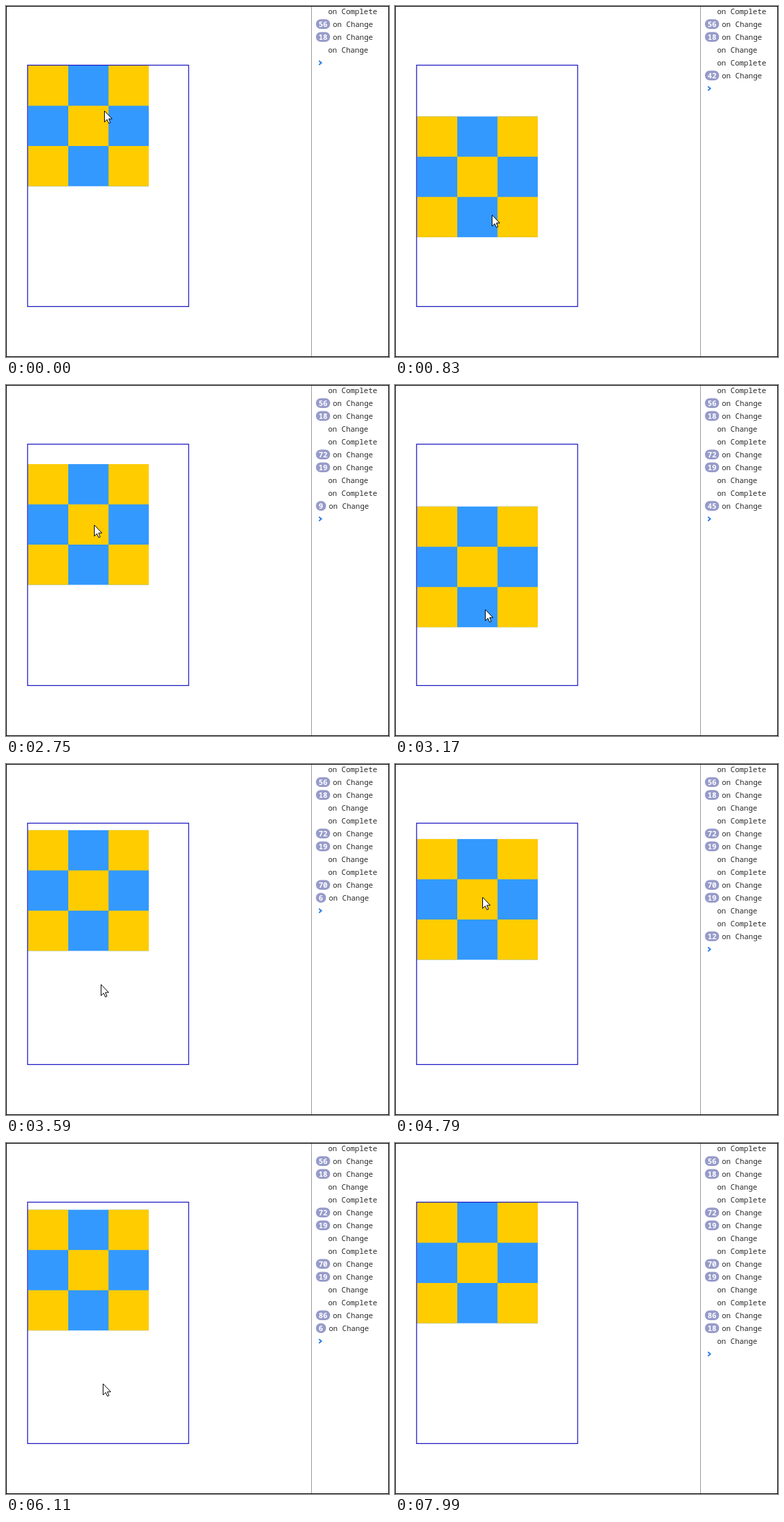
Animation, 566 px wide and 519 px high, one loop 8050 ms. Source, as an HTML page with a canvas:

```html
<!DOCTYPE html>
<html lang="en">
<head>
<meta charset="utf-8">
<title>Pull and bounce</title>
<style>
html, body { margin: 0; width: 100%; height: 100%; overflow: hidden; background: #fff; }
canvas { display: block; }
</style>
</head>
<body>
<canvas id="stage" width="566" height="519"></canvas>
<script>
const ctx = document.getElementById('stage').getContext('2d');
const LOOP = 8050, TICK = 60;
const CELL = 59.5, ROW = 19;

// Runs of steady ticks: [start ms, number of ticks]; the picture rests in between.
const RUNS = [[0, 1], [100, 1], [470, 13], [1310, 78], [6110, 6], [6720, 10], [7570, 1], [7810, 4]];

// Each pull: press and release tick, pointer from (x0, y0) to (x1, y1), y after letting go,
// ease-out power, and the calls logged while pulling and bouncing.
const PULLS = [
  { down: 1, up: 13.62, x0: 144, y0: 158, x1: 139, y1: 348, rest: 348, power: 1.8, calls: 72, bounces: 19 },
  { down: 37.2, up: 51.3, x0: 130, y0: 149, x1: 140, y1: 349, rest: 326, power: 2.45, calls: 70, bounces: 19 },
  { down: 70.17, up: 91.343, x0: 129, y0: 151, x1: 143, y1: 356, rest: 356, power: 1.735, calls: 86, bounces: 18 }
];
const START = { x: 145, y: 155 };
const LEAVE = { down: 109, x0: 122, y0: 194 };
const EXIT = 113, REST = 6, SLIP = 1.6;

const clamp = t => Math.min(1, Math.max(0, t));
const mix = (a, b, t) => a + (b - a) * t;
const smooth = t => t * t * (3 - 2 * t);
const pullTime = (p, k) => clamp((k - p.down) / (Math.floor(p.up) - p.down));
const bounceCount = (p, k) => Math.floor((k - p.up) * 3.6 + 0.3);

function tickAt(ms) {
  let tick = 0, base = 0;
  for (const [start, n] of RUNS) {
    if (ms < start) break;
    tick = base + Math.min(n - 1, Math.floor((ms - start) / TICK));
    base += n;
  }
  return tick;
}

function pointer(k) {
  const begun = PULLS.filter(p => k >= p.down).length;
  if (!begun) return START;
  if (k > LEAVE.down) {
    const t = (k - LEAVE.down) / 3;
    return { x: LEAVE.x0 + 258 * t * t, y: LEAVE.y0 - 50 * t };
  }
  const p = PULLS[begun - 1];
  if (k < p.up) {
    const t = pullTime(p, k);
    return { x: mix(p.x0, p.x1, t ** 3), y: mix(p.y0, p.y1, 1 - (1 - t) ** p.power) };
  }
  const next = PULLS[begun] || LEAVE;
  const leave = p.up + REST;
  const home = smooth(clamp((k - leave) / (next.down - leave)));
  const still = mix(p.y1, p.rest, clamp((k - p.up) / SLIP));
  return { x: mix(p.x1, next.x0, home), y: mix(still, next.y0, home) };
}

function gridOffset(k) {
  const p = PULLS.filter(q => k >= q.down).pop();
  if (!p) return 0;
  if (k < p.up) return (pointer(k).y - p.y0) / 2;
  if (bounceCount(p, k) > p.bounces) return 0;
  return (p.y1 - p.y0) / 2 * 2 ** (-10 * (k - p.up) * TICK / 305);
}

function logRows(k) {
  const rows = [];
  const change = n => n > 0 && rows.push(['on Change', n]);
  const complete = () => rows.push(['on Complete', 1]);
  complete();
  [56, 18, 1].forEach(change);
  for (const p of PULLS) {
    if (k < p.down) break;
    complete();
    change(Math.round(p.calls * pullTime(p, k)));
    if (k < p.up) break;
    const n = bounceCount(p, k);
    change(Math.min(n, p.bounces));
    if (n > p.bounces) change(1);
  }
  return rows;
}

function drawGrid(top) {
  const left = 32.5;
  ctx.fillStyle = '#3399ff';
  ctx.fillRect(left, top, 3 * CELL, 3 * CELL);
  ctx.fillStyle = '#ffcc00';
  for (let i = 0; i < 9; i += 2) {
    ctx.fillRect(left + i % 3 * CELL, top + Math.floor(i / 3) * CELL, CELL, CELL);
  }
}

function drawFrames() {
  ctx.lineWidth = 1.25;
  ctx.strokeStyle = '#1a14c0';
  ctx.strokeRect(31.9, 87.5, 238, 356.9);
  ctx.fillStyle = '#999';
  ctx.fillRect(451, 1, 1, 517);
  ctx.lineWidth = 1;
  ctx.strokeStyle = '#000';
  ctx.strokeRect(0.5, 0.5, 565, 518);
}

function drawLog(rows) {
  const face = '11px "Noto Sans Mono", "DejaVu Sans Mono", monospace';
  rows.forEach(([text, n], row) => {
    const y = 8 + ROW * row;
    let x = 476;
    if (n > 1) {
      const w = n > 9 ? 21 : 15;
      ctx.fillStyle = '#979bca';
      ctx.beginPath();
      ctx.roundRect(458, y - 7.5, w, 14.5, 7.25);
      ctx.fill();
      ctx.fillStyle = '#fff';
      ctx.font = 'bold ' + face;
      ctx.fillText(n, 462, y + 4);
      x = 462 + w;
    }
    ctx.fillStyle = '#2a2a2a';
    ctx.font = face;
    ctx.fillText(text, x, y + 4);
  });
  const y = 8 + ROW * rows.length;
  ctx.strokeStyle = '#2a7bea';
  ctx.lineWidth = 1.9;
  ctx.beginPath();
  ctx.moveTo(462.5, y - 3);
  ctx.lineTo(466, y);
  ctx.lineTo(462.5, y + 3);
  ctx.stroke();
}

const ARROW = new Path2D('M.5 .5V17L4.3 13.4L6.9 19L9.2 18L6.8 12.4H11.8Z');

function drawPointer(k) {
  if (k >= EXIT) return;
  const { x, y } = pointer(k);
  ctx.save();
  ctx.translate(Math.round(x), Math.round(y) - 0.5);
  ctx.fillStyle = '#fff';
  ctx.strokeStyle = '#000';
  ctx.lineWidth = 1;
  ctx.fill(ARROW);
  ctx.stroke(ARROW);
  ctx.restore();
}

function draw(ms) {
  const k = tickAt(ms);
  ctx.fillStyle = '#fff';
  ctx.fillRect(0, 0, 566, 519);
  drawGrid(88 + gridOffset(k));
  drawFrames();
  drawLog(logRows(k));
  drawPointer(k);
}

const t0 = performance.now();
function loop() {
  draw((performance.now() - t0) % LOOP);
  requestAnimationFrame(loop);
}
loop();
</script>
</body>
</html>
```
